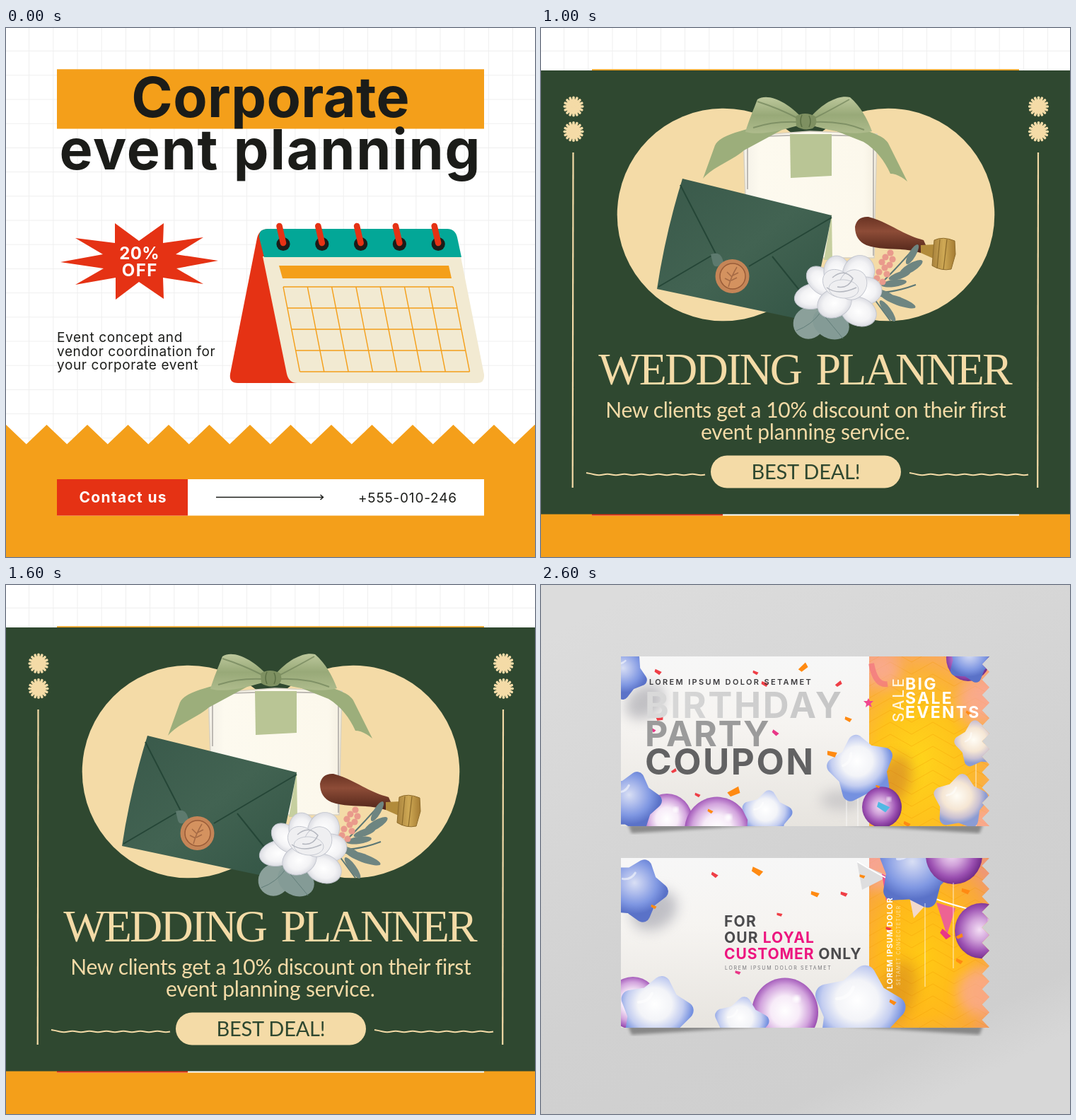
Animation, 748 px wide and 748 px high, one loop 3 s. Source, as an HTML page:

```html
<!DOCTYPE html>
<html lang="en">
<head>
<meta charset="utf-8">
<title>Event cards</title>
<style>
  html, body { margin: 0; width: 100%; height: 100%; overflow: hidden; background: #fff; }
  svg { display: block; width: 100vw; height: 100vh; }
  text { font-family: Inter, "Open Sans", sans-serif; white-space: pre; }
  .bold { font-weight: 700; }
  .lato { font-family: Lato, sans-serif; }
  .serif { font-family: "Liberation Serif", "Noto Serif", serif; word-spacing: 8px; }
</style>
</head>
<body>
<svg id="stage" viewBox="0 0 748 748"></svg>
<script>
const range = (n, f) => Array.from({ length: n }, (_, i) => f(i)).join('');
const path = (d, fill, extra = '') => `<path d="${d}" fill="${fill}" ${extra}/>`;
const line = (d, stroke, width, extra = '') => path(d, 'none', `stroke="${stroke}" stroke-width="${width}" ${extra}`);
const rect = (x, y, w, h, fill, extra = '') => `<rect x="${x}" y="${y}" width="${w}" height="${h}" fill="${fill}" ${extra}/>`;
const circle = (x, y, r, fill, extra = '') => `<circle cx="${x}" cy="${y}" r="${r}" fill="${fill}" ${extra}/>`;
const ellipse = (x, y, rx, ry, turn, fill, extra = '') =>
  `<ellipse rx="${rx}" ry="${ry}" fill="${fill}" transform="translate(${x} ${y}) rotate(${turn})" ${extra}/>`;
const text = (x, y, size, gap, fill, content, extra = '') =>
  `<text x="${x}" y="${y}" font-size="${size}" letter-spacing="${gap}" fill="${fill}" ${extra}>${content}</text>`;
const label = (x, y, size, gap, fill, content, extra = '') =>
  text(x + gap / 2, y, size, gap, fill, content, `text-anchor="middle" ${extra}`);
const upright = (x, y, size, gap, fill, content, extra = '') =>
  text(0, 0, size, gap, fill, content, `transform="translate(${x} ${y}) rotate(-90)" ${extra}`);
const stops = list => list.map(([at, color]) => `<stop offset="${at}" stop-color="${color}"/>`).join('');
const radial = (id, pos, ...list) => `<radialGradient id="${id}" ${pos}>${stops(list)}</radialGradient>`;
const linear = (id, pos, ...list) => `<linearGradient id="${id}" ${pos}>${stops(list)}</linearGradient>`;
const BOLD = 'class="bold"';

function corporate() {
  const orange = '#f49f1a', red = '#e53214', ink = '#1b1c19', teal = '#03a797', cream = '#f2ead2';
  const grid = range(22, i => {
    const p = 32.6 + i * 34.2;
    return `M${p} 0V748M0 ${p}H748`;
  });
  const zigzag = 'M0 561' + range(14, () => 'l28.75 27.5l28.75-27.5') + 'V748H0Z';
  const columns = range(8, i => `M${392 + i * 34.3} 366l23.5 120`);
  const rows = range(5, i => `M${392 + i * 5.9} ${366 + i * 30}h240`);
  const rings = range(5, i => {
    const x = 392 + i * 54.8;
    return circle(x, 305.5, 9.6, ink) + line(`M${x - 5.5} 280l5.5 24`, red, 8.6, 'stroke-linecap="round"');
  });
  return rect(0, 0, 748, 748, '#fff') + line(grid, '#efefef', 1) +
    rect(72, 58.3, 604, 84.2, orange) +
    label(374, 126, 79, .4, ink, 'Corporate', BOLD) +
    label(373, 200, 79, 1.8, ink, 'event planning', BOLD) +
    path('M154 276L188 301L223 276L222 304L279 296L240 320L300 329L241 340L279 362L222 353L223 383L188 359L155 384V353L98 363L138 340L77 331L137 320L98 297L154 304Z', red) +
    label(188.5, 326.5, 24, .3, '#fff', '20%', BOLD) +
    label(188.5, 350.5, 24, 1.5, '#fff', 'OFF', BOLD) +
    ['Event concept and', 'vendor coordination for', 'your corporate event']
      .map((s, i) => text(72, 444 + i * 19.5, 19, .6, ink, s)).join('') +
    path('M372 284Q358 284 355 297L317 489Q315 502 328 502H420Z', red) +
    path('M363 323H643L676 490Q677 502 666 502H412Q400 502 397 489Z', cream) +
    path('M371 284H624Q635 284 638 296L644 324H365L358 296Q357 284 371 284Z', teal) +
    path('M386 336H626L630 354H391Z', orange) + line(columns + rows, orange, 1.4) + rings +
    path(zigzag, orange) + rect(72, 638, 604, 51.5, '#fff') + rect(72, 638, 185, 51.5, red) +
    label(165, 671, 21, 1.3, '#fff', 'Contact us', BOLD) +
    line('M297 663.5H448M444.5 660l4 3.5l-4 3.5', ink, 1.4) +
    label(567.5, 671, 19, .8, ink, '+555-010-246');
}

function wedding() {
  const green = '#2f4830', sand = '#f4dba7';
  const leaf = '#6e8581', petal = 'stroke="#c3c6cf" stroke-width=".9"';
  const rosette = (x, y) => circle(x, y, 10.5, sand) + range(16, i =>
    line(`M${x} ${y}v-12.8`, sand, 3.6, `stroke-linecap="round" transform="rotate(${i * 22.5} ${x} ${y})"`));
  const wave = x => line(`M${x} 629q6 1 12 2.5` + range(13, () => 't12 0'), sand, 2) ;
  const side = x => rosette(x, 111) + rosette(x, 146.5) + line(`M${x - .5} 176L${x - 1.3} 650`, sand, 2.2);

  const gift = path('M286 153L380 146L475 150L473 230L471 325H292Z', 'url(#paper)', 'stroke="#d8d2c4" stroke-width="1.5"') +
    line('M288 154L378 151L471 153M470 154V322M292 160V228', '#bdb9b3', 2) +
    path('M352 150H411V209L353 212Z', '#b9c595') + path('M411 262L400 328H412Z', '#c6cf9f');
  const bow =
    path('M305 140C272 147 251 155 246 166L229 213C243 196 270 188 287 173L350 139Z', '#9cae7b') +
    path('M440 140C470 147 486 154 491 163L518 217Q505 206 494 206C486 188 474 172 456 161L398 138Z', '#9cae7b') +
    path('M370 128C350 106 322 91 306 101C300 117 294 130 289 147C315 153 345 143 370 136Z', 'url(#ribbon)') +
    path('M381 126C400 104 423 94 437 98C451 110 461 127 468 146C442 153 407 145 381 137Z', 'url(#ribbon)') +
    line('M366 129Q335 113 306 104M365 133Q330 131 300 141M384 129Q415 113 436 101M385 133Q425 131 457 144', '#71845a', 2, 'opacity=".7"') +
    path('M360 125Q373 117 388 125Q392 137 384 142Q372 146 361 139Z', '#7e9061') +
    line('M369 123q-4 8 0 17M379 124q4 8 0 16', '#5c7045', 1.5);
  const envelope = path('M200 213L411 265Q397 340 377 414L164 369Q176 290 200 213Z', 'url(#velvet)') +
    line('M197 222L249 323M411 268L294 337M166 366L246 319M327 323L368 374', '#254637', 2) +
    path('M240 320Q255 314 258 332Q246 342 243 333Z', '#5d7a6e') +
    circle(270.5, 351, 24, '#c58557') + circle(271, 351, 18, '#d4925f', 'stroke="#995c38" stroke-width="1.5"') +
    line('M265 366Q269 351 277 338M270 352l-7-7M271 350l8-4M268 358l-8-4M269 357l8-4', '#a56a45', 1.5);
  const stamp = path('M444 281Q447 266 463 267C493 275 510 292 541 300L545 309L537 318C509 309 486 316 460 307Q444 300 444 281Z', 'url(#wood)') +
    path('M537 307L558 306L555 326L537 318Z', '#b28b3b') +
    path('M556 300Q568 294 585 301L586 320L580 341Q566 344 553 336Z', 'url(#brass)', 'stroke="#8d6b2b" stroke-width="1"') +
    line('M564 299L560 340M574 299L569 342', '#8a692a', 1.2);
  const sprig = line('M448 391Q480 365 529 310M475 374Q501 374 530 363M463 372L494 414', '#5c7775', 2) +
    [[507, 350, 16, 5, -18], [523, 339, 19, 6, -31], [525, 320, 16, 5, -60], [499, 361, 18, 5, -8], [505, 386, 26, 6, 20], [490, 400, 18, 5, 54], [481, 375, 18, 5, 17]]
      .map(a => ellipse(...a, leaf)).join('') +
    [[494, 318], [487, 324], [497, 327], [482, 331], [493, 335], [486, 339], [478, 345], [489, 348], [475, 354], [483, 359], [473, 365]]
      .map(([x, y]) => circle(x, y, 4.6, '#e99a8c')).join('');
  const flower = ellipse(379, 417, 22, 23, 35, '#8ba09a') + ellipse(410, 418, 27, 21, 28, '#849b96') +
    line('M361 428Q383 420 396 401M427 439Q412 421 398 404', '#627e7a', 1) +
    [[386, 379, 28, 18, -12], [397, 358, 25, 17, 43], [419, 346, 24, 19, 82], [449, 346, 22, 25, 24], [457, 372, 25, 20, -7], [449, 401, 26, 20, 22], [415, 389, 25, 20, -26]]
      .map(a => ellipse(...a, 'url(#petal)', petal)).join('') +
    [[419, 361, 22, 18, 38], [441, 363, 19, 22, 31], [428, 369, 21, 13, 4]].map(a => ellipse(...a, '#efeff1', petal)).join('') +
    line('M412 353Q428 339 441 354Q434 369 419 366M404 367Q420 379 446 367', '#b4b7bf', 1.5);

  return rect(0, 60, 748, 627.5, green) + side(46) + side(703.5) +
    circle(258, 264, 150.3, sand) + circle(491, 264, 150.3, sand) +
    gift + bow + envelope + stamp + sprig + flower +
    label(374, 504, 64, -2.8, sand, 'WEDDING PLANNER', 'class="serif"') +
    label(374.5, 551, 30, -.35, sand, 'New clients get a 10% discount on their first', 'class="lato"') +
    label(374, 582, 30, -.2, sand, 'event planning service.', 'class="lato"') +
    rect(240, 604.5, 269, 46, sand, 'rx="23"') + label(374.5, 638, 29, -.2, green, 'BEST DEAL!', 'class="lato"') +
    wave(64) + wave(521);
}

// A puffy five-lobed balloon: a star whose thick round outline softens its corners.
function star(x, y, r, turn, fill) {
  const points = Array.from({ length: 10 }, (_, i) => {
    const a = i * Math.PI / 5, d = r * (i % 2 ? .5 : .77);
    return `${(d * Math.sin(a)).toFixed(1)},${(-d * Math.cos(a)).toFixed(1)}`;
  }).join(' ');
  const paint = `url(#${fill})`;
  return `<g transform="translate(${x} ${y}) rotate(${turn})"><polygon points="${points}" fill="${paint}" stroke="${paint}" stroke-width="${r * .46}" stroke-linejoin="round"/>` +
    line(`M${-r * .2} ${-r * .5}Q${-r * .25} ${-r * .25} ${-r * .5} ${-r * .2}`, '#fff', r * .07, 'opacity=".55" stroke-linecap="round"') + '</g>';
}

function balloon(x, y, r, fill = 'plum') {
  return ellipse(x, y, r, r * 1.03, 0, `url(#${fill})`) + circle(x + r * .35, y - r * .4, r * .1, '#fff', 'filter="url(#soft)"');
}

function confetti(...pieces) {
  const colors = ['#ff8a12', '#ef3e46', '#e93687', '#52b9e4'];
  return pieces.map(([x, y, size, turn, c]) =>
    path(`M${-size} ${-size * .4}L${size} ${-size * .55}L${size * .8} ${size * .5}L${-size * .8} ${size * .4}Z`,
      colors[c], `transform="translate(${x} ${y}) rotate(${turn})"`)).join('');
}

function coupon(y, glow, content) {
  const edge = `M113 ${y}H634` + range(11, () => 'l-10.5 10.9l10.5 10.92') + 'H113Z';
  const chevrons = range(17, i => `M464 ${y + 8 + i * 17}` + range(3, () => 'l30-17l30 17'));
  const lift = `M123 ${y + 237}H330L128 ${y + 250}Z M625 ${y + 237}H418L620 ${y + 250}Z`;
  return path(lift, '#000', 'opacity=".35" filter="url(#soft)"') +
    `<clipPath id="cut${y}"><path d="${edge}"/></clipPath><g clip-path="url(#cut${y})">` +
    rect(113, y, 352, 240, 'url(#card)') + rect(464, y, 171, 240, `url(#${glow})`) +
    `<g clip-path="url(#stub)">${line(chevrons, '#ef9700', 1, 'opacity=".35"')}</g>` + content + '</g>';
}

function birthday() {
  const pink = '#ed157f', gray = '#4b4b4d';
  const blur = 'filter="url(#haze)"';
  const blush = (x, y, r) => circle(x, y, r, '#f9a9a0', `opacity=".7" ${blur} clip-path="url(#stub)"`);
  const strings = d => line(d, '#fff', 1, 'opacity=".75"');
  const top =
    ellipse(147, 165, 30, 22, -35, '#8d8d96', `opacity=".5" ${blur}`) + ellipse(425, 304, 30, 14, 0, '#858592', `opacity=".3" ${blur}`) +
    ellipse(500, 275, 22, 35, 20, '#b85a30', `opacity=".4" ${blur}`) +
    blush(484, 122, 24) + blush(618, 165, 30) + blush(628, 335, 24) +
    balloon(604, 104, 31, 'violet') + star(607, 106, 33, 18, 'deep') + strings('M615 244V341M473 278V341M432 302V341M448 299V341') +
    star(618, 225, 34, -10, 'cream') + star(593, 307, 40, 5, 'cream') +
    star(453, 260, 49, -12, 'blue') + balloon(482, 314, 28, 'violet') +
    balloon(178, 332, 36) + balloon(249, 347, 46) + star(127, 307, 44, 15, 'deep') + star(319, 327, 37, 7, 'blue') +
    star(115, 126, 36, 35, 'deep') +
    line('M467 111Q473 143 490 140', '#f2697f', 8, 'opacity=".6"') +
    path('M463 160l2 4 5 0-4 4 2 5-5-3-4 3 1-5-4-4 5 0Z', '#f0478f') +
    confetti([371, 117, 7, -40, 0], [316, 140, 5, 25, 1], [303, 124, 4, 25, 1], [421, 140, 5, -35, 1], [434, 190, 5, 25, 0], [411, 239, 7, 15, 0], [273, 293, 9, -25, 0], [239, 320, 4, 30, 0], [168, 189, 5, -10, 1], [331, 209, 5, 40, 2], [158, 205, 4, 35, 2], [221, 297, 4, 25, 1], [483, 314, 9, 30, 3], [165, 123, 5, 30, 1], [188, 263, 4, -30, 1], [604, 181, 4, 40, 0], [476, 285, 3, 20, 0], [517, 338, 5, 30, 0]) +
    text(153, 141, 11, 2.35, '#3b3a3d', 'LOREM IPSUM DOLOR SETAMET', 'font-weight="600"') +
    text(147, 188, 51, 2.6, 'url(#fade)', 'BIRTHDAY', BOLD) +
    text(147, 228, 50, 1.7, '#9b9b9b', 'PARTY', BOLD) + text(147, 268, 51, 2.5, '#626263', 'COUPON', BOLD) +
    ['BIG', 'SALE', 'EVENTS'].map((s, i) => text(515, 148 + i * 20.2, 23, 2.3, '#fff', s, BOLD)).join('') +
    upright(512.5, 194, 21, 3, '#fff4dc', 'SALE', 'font-weight="500"');
  const bottom =
    ellipse(160, 460, 34, 26, -30, '#898a98', `opacity=".5" ${blur}`) +
    ellipse(505, 575, 24, 45, 15, '#ba6724', `opacity=".35" ${blur}`) +
    blush(482, 400, 32) + blush(622, 575, 34) +
    star(134, 432, 46, 20, 'deep') +
    path('M447 392L491 412L454 431Z', '#dededf') + path('M482 408L502 418L488 447Z', '#ef548b') +
    path('M519 431L551 445L527 471Z', '#f3d9cb') + path('M559 449L586 457L574 495Z', '#ed6393') +
    line('M447 391Q530 443 634 465', '#fff', 2) +
    star(529, 404, 56, 12, 'deep') + balloon(584, 382, 40, 'violet') + balloon(623, 489, 38, 'violet') +
    strings('M543 450V568M583 421V542') +
    balloon(130, 591, 36) + star(162, 606, 54, 12, 'blue') + balloon(345, 604, 47) +
    star(283, 622, 40, 8, 'blue') + star(449, 604, 67, 10, 'blue') +
    confetti([305, 405, 8, 30, 0], [245, 410, 5, 35, 1], [387, 437, 6, 20, 0], [337, 466, 4, 15, 1], [159, 455, 4, 25, 0], [428, 437, 5, 20, 1], [278, 548, 4, 20, 2], [454, 412, 4, 20, 0], [571, 494, 8, 45, 2], [497, 590, 5, 30, 0], [592, 497, 5, -25, 0], [600, 433, 6, 20, 0], [491, 486, 4, 20, 1], [591, 532, 5, 30, 0]) +
    text(259, 482.5, 21, 1.2, gray, 'FOR', BOLD) +
    text(259, 506, 21, 1.1, gray, `OUR <tspan fill="${pink}">LOYAL</tspan>`, BOLD) +
    text(259, 529, 21, .9, gray, `<tspan fill="${pink}">CUSTOMER</tspan> ONLY`, BOLD) +
    text(260, 544, 7, 1.7, '#77777a', 'LOREM IPSUM DOLOR SETAMET') +
    upright(497, 571, 11, .7, '#fff', 'LOREM IPSUM DOLOR', BOLD) +
    upright(508, 566, 7, 1.1, '#fff', 'SETAMET CONSECTETUER', 'opacity=".6"');
  return rect(0, 0, 748, 748, 'url(#wall)') + coupon(101, 'sunTop', top) + coupon(386, 'sunBottom', bottom);
}

const defs = '<defs>' +
  linear('paper', '', [0, '#f3f0e7'], [.12, '#fdfaef'], [.9, '#fcf8ec'], [1, '#f3eee0']) +
  linear('ribbon', 'x2="0" y2="1"', [0, '#bdc89c'], [.5, '#98a978'], [1, '#aebb8c']) +
  linear('velvet', 'x2="1" y2="1"', [0, '#39594a'], [.5, '#426352'], [1, '#325444']) +
  linear('wood', 'x2="0" y2="1"', [0, '#693323'], [.4, '#8d4c37'], [1, '#512519']) +
  linear('brass', '', [0, '#a8823d'], [.5, '#cfa955'], [1, '#a47b32']) +
  radial('petal', '', [0, '#fff'], [.65, '#f3f3f5'], [1, '#dcdde3']) +
  linear('wall', 'gradientUnits="userSpaceOnUse" x1="150" y1="0" x2="520" y2="748"',
    [0, '#dcdcdc'], [.62, '#d1d1d1'], [.9, '#cfcfcf'], [1, '#d7d7d7']) +
  linear('card', 'x2="0" y2="1"', [0, '#f7f7f7'], [.4, '#f6f4f1'], [1, '#e7e4df']) +
  linear('fade', '', [0, '#dadada'], [1, '#c5c5c5']) +
  radial('sunTop', 'cx=".4" cy=".62" r=".72"', [0, '#ffd51b'], [.48, '#fec31c'], [.75, '#fbb13c'], [1, '#f7a577']) +
  radial('sunBottom', 'cx=".45" cy=".58" r=".7"', [0, '#ffc914'], [.5, '#ffb91b'], [.8, '#f9a83c'], [1, '#ef9872']) +
  radial('blue', 'cx=".45" cy=".38" r=".68"', [0, '#fff'], [.45, '#f3f4f8'], [.75, '#c3cdf0'], [1, '#7591e0']) +
  radial('deep', 'cx=".42" cy=".4" r=".68"', [0, '#d9dff4'], [.35, '#aebcec'], [.7, '#7f97e2'], [1, '#5a72c8']) +
  radial('cream', 'cx=".4" cy=".4" r=".7"', [0, '#fffdf6'], [.5, '#f5e6d4'], [.8, '#c9c0d2'], [1, '#8b9cd4']) +
  radial('plum', 'cx=".5" cy=".48" r=".54"', [0, '#fff'], [.4, '#f7ebf8'], [.7, '#d2a4dd'], [.9, '#a45bba'], [1, '#863d9e']) +
  radial('violet', 'cx=".46" cy=".48" r=".57"', [0, '#f4dff5'], [.35, '#d1a2da'], [.7, '#9c51b2'], [1, '#682482']) +
  '<filter id="soft"><feGaussianBlur stdDeviation="2"/></filter>' +
  '<filter id="haze" x="-1" y="-1" width="3" height="3"><feGaussianBlur stdDeviation="9"/></filter>' +
  '<clipPath id="stub"><rect x="464" y="101" width="171" height="525"/></clipPath></defs>';

const stage = document.getElementById('stage');
stage.innerHTML = defs + [corporate, wedding, birthday].map(draw => `<g class="card">${draw()}</g>`).join('');
const cards = stage.querySelectorAll('.card');

// Each card covers the ones beneath it for one second.
function tick() {
  const current = Math.floor(performance.now() % 3000 / 1000);
  cards.forEach((card, i) => { card.style.display = i <= current ? '' : 'none'; });
  requestAnimationFrame(tick);
}
tick();
</script>
</body>
</html>
```
